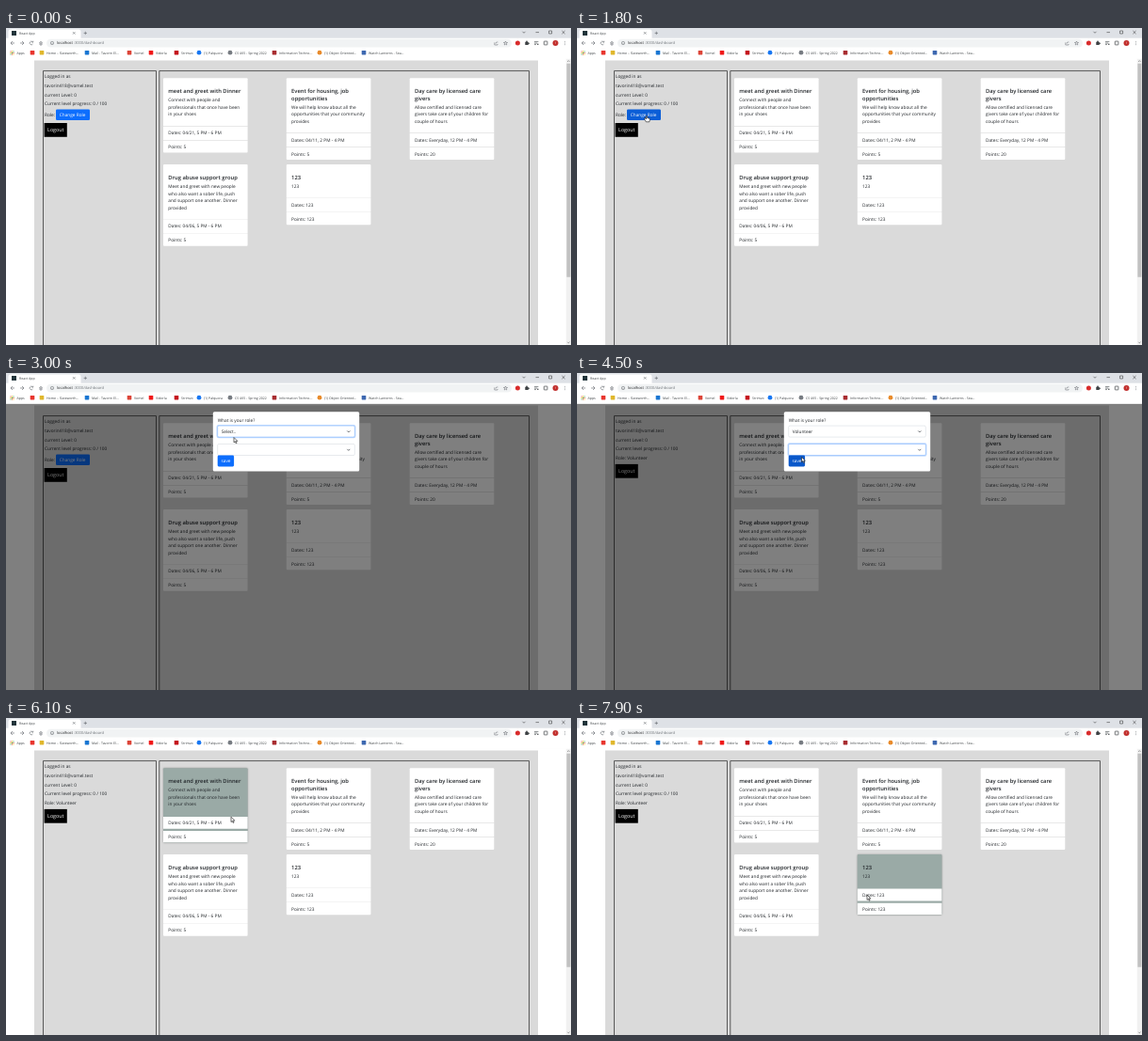
Write an HTML page with a canvas that moves like this. It is 600x337 px and loops after 8000 ms.

```html
<!DOCTYPE html>
<html lang="en">
<head>
<meta charset="utf-8">
<title>Dashboard</title>
<style>
html, body { margin: 0; height: 100%; overflow: hidden; background: #fff; }
canvas { display: block; width: 100vw; height: 100vh; }
</style>
</head>
<body>
<canvas id="stage"></canvas>
<script>
const W = 600, H = 337, LOOP = 8000, STEP = 100;
const INK = '#212529', BLUE = '#0d6efd', BLUE_HOVER = '#0b5ed7', GREY = '#5f6368';
const BODY = 4.75, TITLE = 5.8, SMALL = 3.55;
const canvas = document.getElementById('stage');
const g = canvas.getContext('2d');
const ratio = window.devicePixelRatio || 1;
canvas.width = Math.round(W * ratio);
canvas.height = Math.round(H * ratio);

const clamp = v => Math.max(0, Math.min(1, v));
const easeOut = p => 1 - (1 - clamp(p)) ** 3;
const smooth = p => p * p * (3 - 2 * p);
const inside = (p, [x, y, w, h]) => p && p.x >= x && p.x <= x + w && p.y >= y && p.y <= y + h;

function rect(x, y, w, h, color, r = 0) {
  g.fillStyle = color;
  g.beginPath();
  g.roundRect(x, y, w, h, r);
  g.fill();
}

function frame(x, y, w, h, color, width, r = 0) {
  g.strokeStyle = color;
  g.lineWidth = width;
  g.beginPath();
  g.roundRect(x, y, w, h, r);
  g.stroke();
}

function disc(x, y, r, color) {
  g.fillStyle = color;
  g.beginPath();
  g.arc(x, y, r, 0, 7);
  g.fill();
}

function line(points, color = GREY, width = .6) {
  g.strokeStyle = color;
  g.lineWidth = width;
  g.beginPath();
  points.forEach(([x, y]) => g.lineTo(x, y));
  g.stroke();
}

// Text is set large and scaled down so small glyphs keep exact spacing.
function text(str, x, midY, size = BODY, color = INK, weight = 400) {
  g.save();
  g.translate(x, midY + size * .34);
  g.scale(.25, .25);
  g.font = `${weight} ${size * 4}px "Open Sans", "Noto Sans", sans-serif`;
  g.textRendering = 'geometricPrecision';
  g.fillStyle = color;
  g.fillText(str, 0, 0);
  g.restore();
}

// Browser window
const bookmarks = [
  [28, '', '#e8352e'], [38, 'Home – Slateworth...', '#e0b72c'],
  [86, 'Mail - Tavorin El...', '#1976d2'], [131, 'Vomel', '#dc4437'],
  [154, 'Vidorla', '#f01818'], [181, 'Strimvo', '#c4141c'],
  [205, '(1) Palquora', '#1877f2', true], [238, 'CS 465 - Spring 2022', '#777c82', true],
  [285, 'Information Techno...', '#a82c30'], [333, '(1) Object Oriented...', '#e88a2a', true],
  [380, 'Watch Lanterns - Sea...', '#3d68b0']
];

function arrowIcon(x, dir) {
  line([[x - 2 * dir, 16], [x + 2 * dir, 16]]);
  line([[x, 14], [x + 2 * dir, 16], [x, 18]]);
}

function drawWindow() {
  rect(0, 0, W, 11, '#dee1e6');
  rect(2.5, 1.5, 77, 11, '#fff', 2.2);
  rect(0, 10.7, W, 22, '#fff');
  rect(6, 3, 5, 5, '#20343a');
  text('React App', 14, 5.5, SMALL, '#3c4043');
  line([[71, 4.2], [73.4, 6.6]]);
  line([[73.4, 4.2], [71, 6.6]]);
  line([[82.6, 5.4], [86, 5.4]]);
  line([[84.3, 3.7], [84.3, 7.1]]);
  line([[548.5, 3.8], [550, 5.3], [551.5, 3.8]], '#222', .5);
  line([[562.5, 4.6], [566, 4.6]], '#222', .5);
  frame(576.6, 3, 3, 3, '#222', .5);
  line([[590.4, 3], [593.6, 6.2]], '#222', .5);
  line([[593.6, 3], [590.4, 6.2]], '#222', .5);

  arrowIcon(7, -1);
  arrowIcon(17, 1);
  g.strokeStyle = GREY;
  g.lineWidth = .6;
  g.beginPath();
  g.arc(27, 16, 1.8, .6, 5.5);
  g.stroke();
  line([[27.3, 15.1], [28.8, 15.1], [28.8, 13.7]]);
  line([[35.3, 16], [37, 14.2], [38.7, 16]]);
  frame(36, 16, 2, 2, GREY, .6);

  rect(43, 11.7, 494, 8.8, '#f1f3f4', 4.4);
  frame(47.3, 14.3, 3.4, 3.4, GREY, .5, 1.7);
  line([[49, 15.6], [49, 17.1]], GREY, .5);
  text('localhost', 54, 16.1, 4.05, '#202124');
  text(':3000/dashboard', 71.8, 16.1, 4.05, '#70757a');
  line([[518.8, 15.3], [518.8, 18], [522, 18], [522, 17]], GREY, .5);
  line([[520, 16.6], [520.8, 15], [522.4, 15]], GREY, .5);
  g.strokeStyle = GREY;
  g.lineWidth = .5;
  g.beginPath();
  for (let i = 0; i < 10; i++) {
    const r = i % 2 ? .95 : 2.2, a = i * Math.PI / 5 - Math.PI / 2;
    g.lineTo(530.5 + r * Math.cos(a), 16.2 + r * Math.sin(a));
  }
  g.closePath();
  g.stroke();
  disc(543.4, 16, 2.5, '#d92b2b');
  rect(551.3, 14.7, 3.4, 3.4, '#3c4043', .4);
  disc(553, 14.4, .8, '#3c4043');
  disc(555, 16.4, .8, '#3c4043');
  line([[561, 14.6], [565.4, 14.6]], '#3c4043', .6);
  line([[561, 16.1], [564, 16.1]], '#3c4043', .6);
  line([[561, 17.6], [563, 17.6]], '#3c4043', .6);
  disc(564.8, 17.2, .8, '#3c4043');
  frame(571.3, 14.1, 3.6, 3.8, '#3c4043', .7, .4);
  disc(583.5, 16, 3, '#c2302e');
  text('T', 582.7, 16, 3, '#fff');
  [14.3, 16, 17.7].forEach(y => disc(593.7, y, .45, GREY));

  const dots = ['#ea4335', '#fbbc04', '#34a853'];
  for (let i = 0; i < 9; i++)
    rect(4.5 + i % 3 * 1.5, 24.4 + Math.floor(i / 3) * 1.5, 1, 1, dots[(i + Math.floor(i / 3)) % 3]);
  text('Apps', 11.5, 26.3, SMALL, '#3c4043');
  for (const [x, label, color, round] of bookmarks) {
    if (round) disc(x, 26.2, 2.4, color);
    else rect(x - 2.3, 24, 4.6, 4.4, color, .6);
    text(label, x + 5, 26.3, SMALL, '#3c4043');
  }
}

// Dashboard page
const cards = [
  { x: 167, y: 53.3, title: ['meet and greet with Dinner'], dates: '04/21, 5 PM - 6 PM', points: 5,
    copy: ['Connect with people and', 'professionals that once have been', 'in your shoes'] },
  { x: 297.8, y: 53.3, title: ['Event for housing, job', 'opportunities'], dates: '04/11, 2 PM - 4 PM', points: 5,
    copy: ['We will help know about all the', 'opportunities that your community', 'provides'] },
  { x: 428.7, y: 53.3, title: ['Day care by licensed care', 'givers'], dates: 'Everyday, 12 PM - 4 PM', points: 20,
    copy: ['Allow certified and licensed care', 'givers take care of your children for', 'couple of hours'] },
  { x: 167, y: 145, title: ['Drug abuse support group'], dates: '04/06, 5 PM - 6 PM', points: 5,
    copy: ['Meet and greet with new people', 'who also want a sober life, push', 'and support one another. Dinner', 'provided'] },
  { x: 297.8, y: 145, title: ['123'], copy: ['123'], dates: '123', points: 123 }
];
for (const c of cards) {
  c.copyY = c.y + 23.4 + (c.title.length - 1) * 7.5;
  c.datesY = c.copyY + (c.copy.length - 1) * 7.5 + 19.8;
  c.box = [c.x, c.y, 89.6, c.datesY + 21 - c.y];
}

function drawCard(c, hovered) {
  const [x, y, w, h] = c.box;
  if (hovered) {
    g.save();
    g.shadowColor = 'rgba(0,0,0,.35)';
    g.shadowBlur = 2;
    rect(x, y, w, h, '#9aaaa6', 1);
    g.restore();
    rect(x, c.datesY - 6.6, w, 12.8, '#fff');
    rect(x, c.datesY + 8.6, w, 12.2, '#fff');
  } else {
    rect(x, y, w, h, '#fff', 1);
    for (const dy of [-7.5, 7.5])
      rect(x, c.datesY + dy, w, .4, 'rgba(0,0,0,.18)');
  }
  c.title.forEach((s, i) => text(s, x + 5.3, y + 13.8 + i * 7.5, TITLE, INK, 600));
  c.copy.forEach((s, i) => text(s, x + 5.3, c.copyY + i * 7.5));
  text('Dates: ' + c.dates, x + 5.3, c.datesY);
  text('Points: ' + c.points, x + 5.3, c.datesY + 15);
}

const roleButton = [53, 86.5, 36, 11.6];

function drawPage(t, pointer, dimmed) {
  rect(0, 32.5, W, H, '#fff');
  rect(30, 34.6, 535, H, '#dadada');
  frame(39.5, 45.6, 120, H, '#222', .7);
  frame(162.8, 45.6, 392.7, H, '#222', .7);

  text('Logged in as', 41, 51.5);
  text('tavorin418@vomel.test', 41, 61.2);
  text('current Level: 0', 41, 70.9);
  text('Current level progress: 0 / 100', 41, 80.5);
  const chosen = t >= 3700;
  if (chosen) {
    text('Role: Volunteer', 41, 90.2);
  } else {
    text('Role:', 41, 92);
    rect(...roleButton, inside(pointer, roleButton) ? BLUE_HOVER : BLUE, 1.3);
    text('Change Role', 56.8, 92.4, BODY, '#fff');
  }
  const top = chosen ? 96.9 : 101;
  rect(40.6, top, 24.2, 14.8, '#000');
  text('Logout', 44.1, top + 7.5, 5.35, '#fff');

  for (const c of cards) drawCard(c, !dimmed && inside(pointer, c.box));

  if (!dimmed) {
    rect(594.8, 32.5, 5.2, H, '#f1f1f1');
    rect(595.4, 37.8, 4, 227, '#c1c1c1');
    line([[596.3, 35.8], [597.4, 34.7], [598.5, 35.8]], '#505050', .6);
    line([[596.3, 333.8], [597.4, 334.9], [598.5, 333.8]], '#505050', .6);
  }
}

// Role dialog
function modalState(t) {
  if (t < 5950) {
    const age = t - 1930;
    return { alpha: clamp(age / 100), dy: -15.6 * (1 - easeOut(age / 300)) };
  }
  const age = t - 5950;
  return { alpha: clamp(1 - age / 100), dy: -15.6 * easeOut(age / 300) };
}

function drawSelect(y, value, focused) {
  if (focused) rect(223.5, y - 1.2, 148, 14.4, '#c2dbfe', 2.2);
  rect(224.7, y, 145.6, 12, '#fff', 1.3);
  frame(224.7, y, 145.6, 12, focused ? '#86b7fe' : '#ced4da', focused ? .6 : .5, 1.3);
  text(value, 228.7, y + 6.1);
  line([[362.3, y + 5.4], [363.8, y + 6.9], [365.3, y + 5.4]], '#343a40', .7);
}

const saveButton = [224.7, 87.6, 17.4, 11.8];

function drawModal(t, pointer, { alpha, dy }) {
  rect(0, 32.5, W, H, `rgba(0,0,0,${alpha / 2})`);
  g.save();
  g.globalAlpha = alpha;
  g.translate(0, dy);
  rect(219.8, 41.2, 155.4, 63.2, '#fff', 1.5);
  text('What is your role?', 224.7, 50.2);
  drawSelect(56.1, t < 3700 ? 'Select..' : 'Volunteer', t >= 2700 && t < 4400);
  drawSelect(75.5, t < 5300 ? '' : 'Vocational', t >= 4400 && t < 5700);
  rect(...saveButton, inside(pointer, saveButton) ? '#0a58ca' : BLUE, 1.3);
  text('save', 228.5, 93.5, BODY, '#fff');
  g.restore();
}

// Pointer: time, x, y
const path = [
  [700, 150, 258], [1500, 74, 93.5], [2100, 74, 93.5], [2600, 240, 62], [3000, 242, 68.5],
  [3600, 242, 68.5], [4100, 240, 79], [4300, 240, 79], [4600, 238, 93], [4800, 236.5, 87],
  [4900, 236.5, 87], [5000, 237, 87.4], [5200, 237, 87.4], [5600, 238, 96.5], [5900, 238, 96.5],
  [6100, 239, 105.2], [6500, 238, 170], [7000, 262, 185], [7900, 308, 188]
];

function pointerAt(t) {
  if (t < 800) return null;
  const i = path.findIndex(k => k[0] >= t);
  const [t0, x0, y0] = path[i - 1], [t1, x1, y1] = path[i];
  const p = smooth((t - t0) / (t1 - t0));
  return { x: x0 + (x1 - x0) * p, y: y0 + (y1 - y0) * p };
}

const ARROW = new Path2D('M0 0V5.4L1.3 4.2 2.2 6.3 3.1 5.9 2.2 3.9H3.9Z');
const HAND = new Path2D('M-.6 0Q0-.6.6 0V2L3 2.7Q3.6 3 3.4 4L2.8 6.3H-.6L-2.2 3.8Q-2-.1-.6 3.3Z');

function drawPointer({ x, y }, hand) {
  g.save();
  g.translate(x, y);
  g.lineWidth = .6;
  g.strokeStyle = '#111';
  g.fillStyle = '#fff';
  g.fill(hand ? HAND : ARROW);
  g.stroke(hand ? HAND : ARROW);
  g.restore();
}

function draw(now) {
  const t = Math.floor(now % LOOP / STEP) * STEP;
  const pointer = pointerAt(t), modal = modalState(t);
  const open = modal.alpha > 0;
  g.setTransform(canvas.width / W, 0, 0, canvas.height / H, 0, 0);
  drawPage(t, pointer, open);
  if (open) drawModal(t, pointer, modal);
  drawWindow();
  if (pointer) {
    const onButton = open && t > 2100 ? inside(pointer, saveButton) && t >= 5300
      : t < 3700 && inside(pointer, roleButton);
    drawPointer(pointer, onButton);
  }
}

const start = performance.now();
function tick() {
  draw(performance.now() - start);
  requestAnimationFrame(tick);
}
tick();
</script>
</body>
</html>
```
